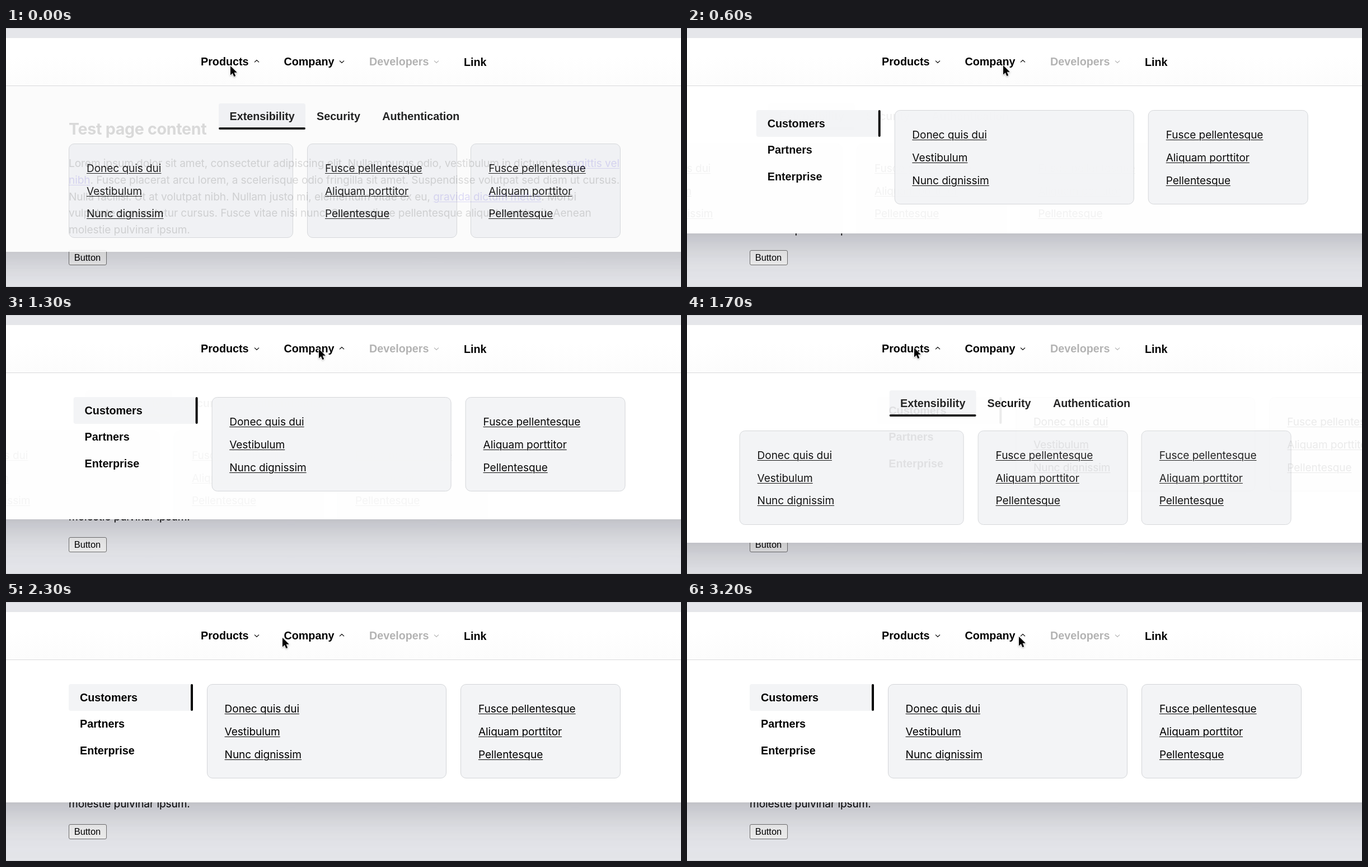
These frames come from a looping animation (1206 px wide and 464 px high, 3300 ms). An HTML page:

```html
<!DOCTYPE html>
<html lang="en">
<head>
<meta charset="utf-8">
<title>Navigation menu</title>
<style>
  html, body { margin: 0; width: 100%; height: 100%; overflow: hidden; }
  body { position: relative; background: #e5e6ea; color: #000; }
  div, svg { position: absolute; box-sizing: border-box; }
  .text { line-height: 0; white-space: pre; }
  .nav { font: 700 19.74px/0 "Liberation Sans", Arial, sans-serif; }
  .copy { font: 400 19.1px/0 Inter, sans-serif; letter-spacing: -.09px; }
  .link, .copy u { text-decoration: underline; text-decoration-thickness: 1.4px; text-underline-offset: 2px; }
  .copy u { color: #2410c8; }
  .title { font: 700 28.6px/0 Inter, sans-serif; letter-spacing: -.3px; }
  .label { font: 400 16.45px/0 "Liberation Sans", Arial, sans-serif; }
  .button { background: #efefef; border: 1.2px solid #707070; border-radius: 3px; }
  .edge { background: #d0d1d5; }
  #header { left: 0; top: 18px; width: 100%; height: 86px; background: linear-gradient(#fff 40%, #fcfcfc); border-bottom: 1px solid #d9d9db; }
  #view {
    left: -200px; right: -200px; top: 104px; background: #fff; overflow: hidden;
    box-shadow: 0 62px 123px -25px rgba(50, 50, 93, .05), 0 37px 74px -37px rgba(0, 0, 10, .26);
  }
  .panel { left: 200px; top: -104px; width: 1206px; height: 464px; }
  .card { background: #f3f4f6; border: 1.2px solid #d3d5d8; border-radius: 10px; }
  .tab { background: #f3f4f6; border-radius: 4px; }
  .bar { background: #000; border-radius: 2px; }
  svg { left: 0; top: 0; overflow: visible; }
  .caret { width: 1px; height: 1px; fill: none; stroke: #000; stroke-width: 1.2; }
  #cursor { width: 14px; height: 21px; filter: drop-shadow(0 1.5px 1.5px rgba(0, 0, 0, .3)); }
</style>
</head>
<body>
<div id="page"></div>
<div id="view"><div class="panel" id="products"></div><div class="panel" id="company"></div></div>
<div id="header"></div>
<div id="menu"></div>
<svg id="cursor"><path d="M0 0V16.5L3.8 12.9L6.4 19.1L9.2 17.9L6.6 11.8H11.8Z" stroke="#fff" stroke-width="1.4" paint-order="stroke"/></svg>
<script>
const $ = id => document.getElementById(id);
const page = $('page'), view = $('view'), menu = $('menu'), cursor = $('cursor');
const products = $('products'), company = $('company');

function text(parent, cls, x, y, html) {
  const el = document.createElement('div');
  el.className = 'text ' + cls;
  el.style.cssText = `left:${x}px;top:${y}px`;
  el.innerHTML = html;
  parent.append(el);
  return el;
}

function box(parent, cls, x, y, w, h) {
  const el = document.createElement('div');
  el.className = cls;
  el.style.cssText = `left:${x}px;top:${y}px;width:${w}px;height:${h}px`;
  parent.append(el);
}

function card(parent, x, y, w, links) {
  box(parent, 'card', x, y, w, 168.5);
  links.forEach((s, i) => text(parent, 'copy link', x + 32, y + 44 + i * 40.6, s));
}

function caret(x, color) {
  menu.insertAdjacentHTML('beforeend',
    `<svg class="caret" style="left:${x}px;top:60.3px;stroke:${color}"><path d="M-4 -1.4L0 2.4L4 -1.4"/></svg>`);
  return menu.lastElementChild.firstChild;
}

// Page behind the menu
text(page, 'title', 112, 181, 'Test page content');
[
  'Lorem ipsum dolor sit amet, consectetur adipiscing elit. Nullam purus odio, vestibulum in dictum et, <u>sagittis vel</u>',
  '<u>nibh</u>. Fusce placerat arcu lorem, a scelerisque odio fringilla sit amet. Suspendisse volutpat sed diam ut cursus.',
  'Nulla facilisi. Ut at volutpat nibh. Nullam justo mi, elementum vitae ex eu, <u>gravida dictum metus</u>. Morbi',
  'vulputate consectetur cursus. Fusce vitae nisi nunc. Suspendisse pellentesque aliquet hendrerit. Aenean',
  'molestie pulvinar ipsum.'
].forEach((s, i) => text(page, 'copy', 112, 242.4 + i * 29.6, s));
box(page, 'button', 112, 398, 67.5, 26.5);
text(page, 'label', 121.7, 411, 'Button');
box(page, 'edge', 0, 0, 1206, 1);
box(page, 'edge', 0, 463, 1206, 1);

// Panels
const first = ['Donec quis dui', 'Vestibulum', 'Nunc dignissim'];
const second = ['Fusce pellentesque', 'Aliquam porttitor', 'Pellentesque'];

box(products, 'tab', 380, 135, 155, 47);
box(products, 'bar', 380, 178.3, 155, 3.7);
text(products, 'nav', 399.5, 158, 'Extensibility');
text(products, 'nav', 555, 158, 'Security');
text(products, 'nav', 672.3, 158, 'Authentication');
card(products, 112, 207, 401, first);
card(products, 538, 207, 267.7, second);
card(products, 830.2, 207, 267.5, second);

box(company, 'tab', 112, 147.3, 222, 47.3);
box(company, 'bar', 330.2, 147.3, 3.7, 47.3);
['Customers', 'Partners', 'Enterprise'].forEach((s, i) =>
  text(company, 'nav', 132, 170.7 + i * 47.4, s));
card(company, 358.6, 147.3, 428.6, first);
card(company, 812, 147.3, 285.7, second);

// Top bar
text(menu, 'nav', 348, 60, 'Products');
text(menu, 'nav', 496.5, 60, 'Company');
text(menu, 'nav', 649, 60, 'Developers').style.color = '#b3b3b3';
text(menu, 'nav', 818, 60.6, 'Link');
const carets = [caret(447.8, '#000'), caret(600, '#000')];
caret(769.3, '#b3b3b3');

// Motion
const LOOP = 3300, STEP = 100, SHIFT = 246.7;
const HEIGHTS = [315, 255];
// Times at which the open menu changes: products and company in turn
const switches = [-138, 418, 760, 1109, 1533, 1910, 2310, 2870];
// Turning points of the pointer: time, x, y
const turns = [
  [0, 401, 68], [200, 407, 69], [600, 565, 67], [900, 412, 64], [1300, 559, 61],
  [1700, 406, 59], [2100, 570, 65], [2500, 418, 63], [2700, 418, 63], [3150, 593, 62]
];

const mix = (a, b, k) => a + (b - a) * k;

// cubic-bezier(.25, .1, .25, 1)
function ease(x) {
  if (x <= 0) return 0;
  if (x >= 1) return 1;
  let lo = 0, hi = 1, u = .5;
  for (let i = 0; i < 24; i++) {
    u = (lo + hi) / 2;
    if (.75 * u * (1 - u) + u ** 3 < x) lo = u; else hi = u;
  }
  return .3 * u * (1 - u) ** 2 + 3 * u * u * (1 - u) + u ** 3;
}

function pointer(t) {
  const i = turns.findLastIndex(p => p[0] <= t);
  const a = turns[i], b = turns[i + 1];
  if (!b) return a.slice(1);
  const k = (1 - Math.cos(Math.PI * (t - a[0]) / (b[0] - a[0]))) / 2;
  return [mix(a[1], b[1], k), mix(a[2], b[2], k)];
}

function place(el, x, opacity) {
  el.style.transform = `translateX(${x}px)`;
  el.style.opacity = opacity;
}

function draw(t) {
  const n = switches.findLastIndex(s => s <= t);
  const open = n % 2, age = t - switches[n];
  const p = ease(age / 250);
  const grow = ease((age - 15) / 300);
  const share = n === 0 ? 0 : open ? p : 1 - p;

  view.style.opacity = n === 0 ? p : 1;
  view.style.height = mix(HEIGHTS[1 - open], HEIGHTS[open], grow) + 'px';
  place(products, -SHIFT * share, 1 - share);
  place(company, SHIFT * (1 - share), share);
  carets.forEach((c, i) => c.setAttribute('transform', i === open ? 'scale(1 -1)' : ''));

  const [x, y] = pointer(t);
  cursor.style.transform = `translate(${x}px, ${y}px)`;
}

const start = performance.now();
function tick() {
  const t = (performance.now() - start) % LOOP;
  draw(Math.floor(t / STEP) * STEP);
  requestAnimationFrame(tick);
}
tick();
</script>
</body>
</html>
```
